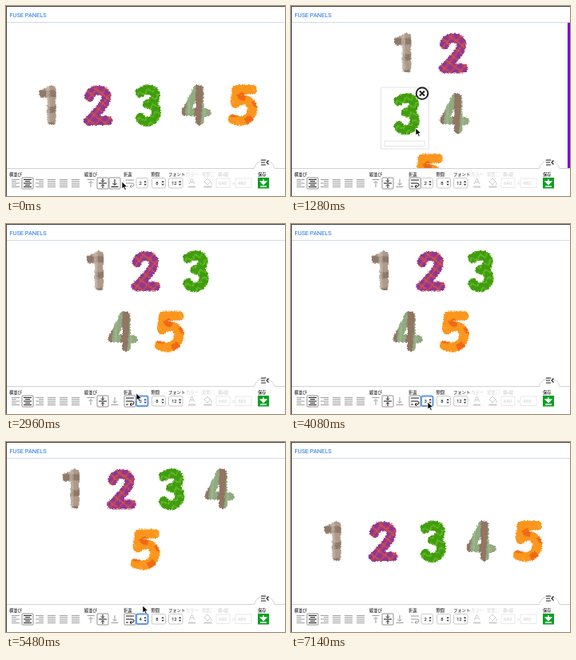
An HTML page that plays this animation: 349 by 238 pixels, repeating every 7.36 s.

```html
<!DOCTYPE html>
<html>
<head>
<meta charset="utf-8">
<style>
  html, body { margin: 0; width: 100%; height: 100%; overflow: hidden; background: #fff; }
  svg { display: block; width: 349px; height: 238px; }
  text { font: 5.3px "Noto Sans CJK JP", "Noto Sans CJK", sans-serif; }
  .num { font: 6px Roboto, sans-serif; }
  .title { font: 7.4px Roboto, sans-serif; fill: #1a73e8; }
  .icon { fill: none; stroke: #999; stroke-width: 1; }
  .icon.on { stroke: #111; }
  .icon rect { display: none; stroke: #777; stroke-width: .8; }
  .icon.on rect { display: inline; }
  .faint { fill: #ccc; }
  .digit { fill: none; stroke-linecap: round; stroke-linejoin: round; }
</style>
</head>
<body>
<svg viewBox="0 0 349 238">
  <defs>
    <filter id="rough" filterUnits="userSpaceOnUse" x="0" y="0" width="61" height="77">
      <feTurbulence baseFrequency=".35" numOctaves="2" seed="4"/>
      <feDisplacementMap in="SourceGraphic" scale="2.4" xChannelSelector="R" yChannelSelector="G"/>
    </filter>
    <pattern id="p0" patternUnits="userSpaceOnUse" x="1" y="3" width="18" height="20">
      <path fill="#ad9a8b" d="M0 0h18v20H0z"/>
      <path fill="#8f7a69" d="M0 11h18v8H0z"/>
      <path fill="#d0c3b6" fill-opacity=".55" d="M6 0h5v20H6z"/>
    </pattern>
    <pattern id="p1" patternUnits="userSpaceOnUse" width="9" height="9" patternTransform="rotate(38)">
      <path fill="#99368c" d="M0 0h9v9H0z"/>
      <path fill="#7c3da0" d="M5 5h3v3H5z"/>
      <path stroke="#d5583c" stroke-width="1.3" d="M0 2h9M2 0v9"/>
    </pattern>
    <pattern id="p2" patternUnits="userSpaceOnUse" width="11" height="10" patternTransform="rotate(-20)">
      <path fill="#419d0c" d="M0 0h11v10H0z"/>
      <path fill="none" stroke="#6dbd35" stroke-width="1.5" d="M0 5Q3 0 5.500 5T11 5"/>
    </pattern>
    <pattern id="p3" patternUnits="userSpaceOnUse" x="30" width="20" height="13" patternTransform="rotate(4)">
      <path fill="#8fab80" d="M0 0h20v13H0z"/>
      <path fill="#927563" d="M2 0h9v13H2z"/>
      <path fill="#b3bfa0" fill-opacity=".5" d="M14 0h2v13h-2z"/>
    </pattern>
    <pattern id="p4" patternUnits="userSpaceOnUse" width="21" height="23" patternTransform="rotate(25)">
      <path fill="#fb961f" d="M0 0h21v23H0z"/>
      <path fill="#ef6914" d="M11 2l7 2 1 7-7 2-5-4z"/>
      <path stroke="#ffb04d" d="M1 16l7 3"/>
    </pattern>
  </defs>
  <rect width="349" height="238" fill="#fff"/>
  <g id="digits"></g>
  <g id="hover" fill="none" stroke="#ddd" stroke-width=".8">
    <path d="M.5.5h60v77H.5zM5 67.500h50v6.500H5z"/>
    <circle cx="52" cy="8" r="7.300" fill="#fff" stroke="#222" stroke-width="1.900"/>
    <path d="M49 5l6 6m0-6l-6 6" stroke="#222" stroke-width="2"/>
  </g>
  <rect id="scroll" x="346" y="21" width="3" height="195" fill="#7c00d8"/>
  <path d="M0 20.500h349" stroke="#cfdcea"/>
  <text class="title" x="4.500" y="13.500">FUSE PANELS</text>
  <path d="M-1 203.500H310.500A13 13 0 0 1 336 203.500H350V239H-1z" fill="#fff" stroke="#d2d2d2"/>
  <path d="M319 193h6m-6 3h5m-5 3h6m3.500-5.500l-2.500 2.500 2.500 2.500" fill="none" stroke="#222" stroke-width="1.200"/>
  <g id="bar"></g>
  <g id="menu"></g>
  <path d="M0 .5H349M.5 0V238" stroke="#444"/>
  <path id="cursor" d="M0 0v9l2.100-1.900 1.600 3.400 1.500-.7-1.500-3.300h2.900z" fill="#000" stroke="#fff" stroke-width=".7"/>
</svg>
<script>
const $ = id => document.getElementById(id);
const LOOP = 7360, PITCH = 60.5, ROW = 76;

const shapes = [
  ['M22 18Q28 17 32 13V52', 11],
  ['M19 22Q21 14 30 14Q41 14 40 24Q39 32 18 52H42', 12],
  ['M22 17Q26 13 33 13Q41 14 41 21Q40 30 31 31Q42 32 42 41Q41 53 30 53Q24 53 22 48', 12],
  ['M33 12L18 41L45 42M36 13V53', 10],
  ['M41 13H22L20 30Q31 23 38 29Q45 37 38 47Q30 56 17 50', 12],
];
$('digits').innerHTML = shapes.map(([d, w], i) =>
  `<g><path class="digit" d="${d}" stroke="url(#p${i})" stroke-width="${w}" filter="url(#rough)"/></g>`).join('');

// Toolbar
const text = (x, y, s, cls = '', anchor = 'start') =>
  `<text x="${x}" y="${y}" class="${cls}" text-anchor="${anchor}">${s}</text>`;
const icon = (x, d, on, id = '') =>
  `<g class="icon ${on ? 'on' : ''}" id="${id}" transform="translate(${x} 222)">
   <rect x="-7" y="-7" width="14" height="14" rx="1"/><path d="${d}"/></g>`;
// align: -1 left, 0 centre, 1 right; short: width of every other line
const lines = (align, short) => [0, 1, 2, 3, 4].map(i => {
  const w = i % 2 ? short : 10;
  return `M${-5 + (10 - w) * (align + 1) / 2} ${i * 2.3 - 4.6}h${w}`;
}).join('');
const select = (x, w, value, id = '') =>
  `<rect id="${id}Box" x="${x}" y="215.500" width="${w}" height="12.500" rx="2" fill="#fff" stroke="#bbb" stroke-width=".8"/>
   <text id="${id}" class="num" x="${x + w / 2 - 2}" y="224" text-anchor="middle">${value}</text>
   <path d="M${x + w - 5} 221l1.600-2.300 1.600 2.300zm0 1.700l1.600 2.300 1.600-2.300z" fill="#333"/>`;
const field = (x, w, value) =>
  `<rect x="${x}" y="216" width="${w}" height="11.500" fill="#fff" stroke="#e4e4e4" stroke-width=".8"/>` +
  text(x + 3, 224, value, 'num faint');

const labels = [[4, '横並び'], [98, '縦並び'], [147, '折返'], [181.5, '隙間'], [203, 'フォント'], [315, '保存']];
const faintLabels = [[225, 'カラー'], [245, '背景□'], [265, '横x縦']];
const wrapIcon = 'M-5-4H5M-5 4h3M-5 0H3a2 2 0 0 1 0 4H0M2 2L0 4l2 2';
$('bar').innerHTML =
  labels.map(([x, s]) => text(x, 213, s)).join('') +
  faintLabels.map(([x, s]) => text(x, 213, s, 'faint')).join('') +
  icon(12, lines(-1, 6)) + icon(27, lines(0, 6), true) + icon(42, lines(1, 6)) +
  [57, 72, 87].map(x => icon(x, lines(0, 10))).join('') +
  icon(106, 'M-4.500-4.500h9M0 5V-2M-2.500 0L0-2.500 2.500 0') +
  icon(121, 'M-5 0H5M0-6v4M-2-3.500l2 2 2-2M0 6V2M-2 3.500l2-2 2 2', true) +
  icon(136, 'M-4.500 4.500h9M0-5V2M-2.500 0L0 2.500 2.500 0', false, 'bottom') +
  icon(155, wrapIcon, false, 'wrap') +
  select(163, 14.5, 2, 'cols') + select(182.5, 17, 8) + select(203.5, 17.5, 12) +
  `<g fill="none" stroke="#ccc"><path d="M229 223l3.500-7 3.500 7m-5.500-2.500h4"/>
   <path d="M248 220l4-4 4 4-4 4zM257 221v3"/><path d="M228 226.500h9M247.500 226.500h10" stroke-width="1.800"/></g>` +
  field(263, 17, 640) + text(282, 224, '×', 'faint') + field(287, 20, 480) +
  `<rect x="315" y="215" width="14" height="13.500" fill="#07a021"/>
   <path d="M322 217v4m-3.500-1h7l-3.500 3.500zM318 226h8" fill="#fff" stroke="#fff" stroke-width="1.400"/>`;

// Cursor path: time, x, y
const path = [
  [0, 145, 220], [20, 145, 220], [160, 151, 218], [980, 151.5, 218], [1280, 156, 153], [1400, 156, 153],
  [1700, 170, 221], [1900, 170, 221], [2100, 168, 229], [2800, 168, 229], [2820, 164, 216], [2960, 163, 212],
  [3380, 168, 188], [3920, 168, 188], [4080, 171, 223], [4200, 171, 223], [4480, 170, 231], [4740, 170, 231],
  [4900, 171, 221], [5080, 171, 221], [5400, 171, 205], [5860, 171, 205], [6200, 152, 218], [6720, 152, 218],
  [6840, 206, 209], [6980, 206, 209], [7140, 322, 240], [LOOP, 322, 240],
];
// Columns chosen over time; 0 means a single unwrapped row
const layouts = [[0, 0], [690, 2], [2620, 3], [4620, 4], [5500, 2], [6280, 0]];
const menus = [[1960, 2400], [4200, 4540], [5080, 5460]];

function cursorAt(t) {
  const i = path.findIndex(p => p[0] > t);
  const [t0, x0, y0] = path[i - 1], [t1, x1, y1] = path[i];
  const k = (t - t0) / (t1 - t0);
  return [x0 + (x1 - x0) * k, y0 + (y1 - y0) * k];
}

function cell(i, wrap) {
  const n = wrap || 5, row = Math.floor(i / n), count = Math.min(n, 5 - row * n);
  const centre = wrap === 0 ? 175.5 : wrap === 2 ? 172.5 : 174.5;
  return [centre + (i % n - count / 2) * PITCH, (wrap ? 25.5 : 91) + row * ROW];
}

function drawMenu(selected, y) {
  const rowY = v => 221 + (v - selected) * 9;
  return `<rect x="157" y="${rowY(2) - 6}" width="25" height="30" rx="2" fill="#2d2d2f"/>` +
    [2, 3, 4].map(v => {
      const mid = rowY(v), lit = Math.abs(mid - y) < 4.5;
      return (lit ? `<rect x="157" y="${mid - 4.5}" width="25" height="9" fill="#0b58d8"/>` : '') +
        (v === selected ? `<path d="M160 ${mid}l1.500 2 2.500-4" fill="none" stroke="#fff"/>` : '') +
        `<text class="num" x="168" y="${mid + 2.2}" fill="#fff">${v}</text>`;
    }).join('');
}

const show = (id, on) => $(id).style.display = on ? '' : 'none';
const place = (el, [x, y]) => el.setAttribute('transform', `translate(${x} ${y})`);

function frame(now) {
  const t = now % LOOP;
  const wrap = layouts.filter(l => l[0] <= t).pop()[1];
  const [x, y] = cursorAt(t);
  const cells = shapes.map((_, i) => cell(i, wrap));
  cells.forEach((c, i) => place($('digits').children[i], c));

  const over = y < 203 && !menus.some(m => t >= m[0] && t < m[1]) &&
    cells.find(c => x > c[0] && x < c[0] + PITCH && y > c[1] && y < c[1] + ROW);
  show('hover', over);
  if (over) place($('hover'), over);
  show('scroll', wrap === 2);

  $('bottom').classList.toggle('on', t < 60);
  $('wrap').classList.toggle('on', t >= 80 && t < 6740);
  $('cols').textContent = wrap || 2;
  const focus = t > 1960 && t < 6280;
  $('colsBox').setAttribute('stroke', focus ? '#5b97ee' : '#bbb');
  $('colsBox').setAttribute('stroke-width', focus ? 2 : .8);

  const open = menus.some(m => t >= m[0] && t < m[1]);
  $('menu').innerHTML = open ? drawMenu(wrap, y) : '';
  place($('cursor'), [x, y]);
  requestAnimationFrame(frame);
}
requestAnimationFrame(frame);
</script>
</body>
</html>
```
